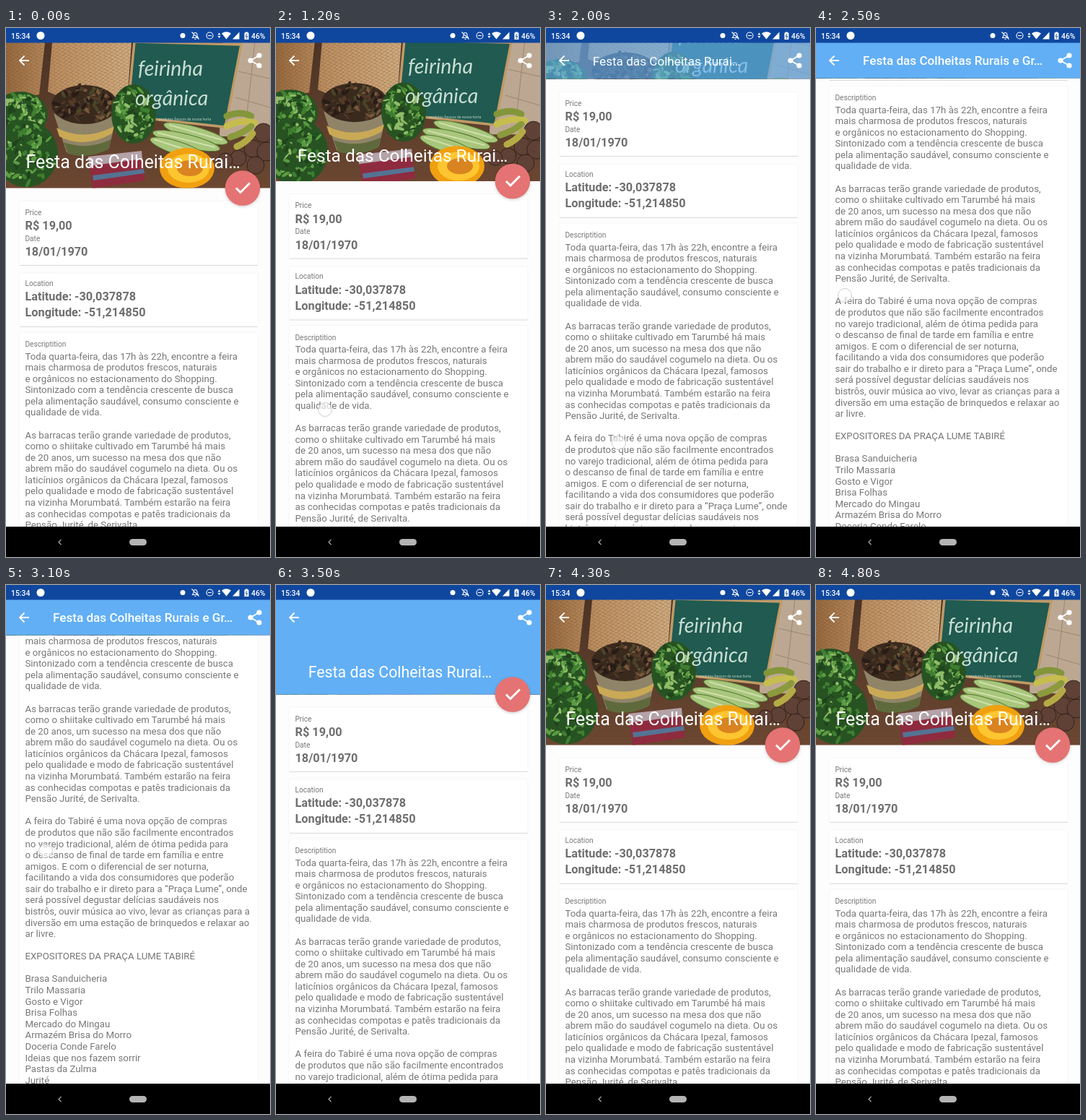
An HTML page that plays this animation: 366x732 px, repeating every 4.9 s.

```html
<!DOCTYPE html>
<html lang="pt">
<head>
<meta charset="utf-8">
<title>Event details</title>
<style>
html, body { margin: 0; width: 100%; height: 100%; overflow: hidden; background: #000 }
svg { display: block }
text { font-family: Roboto, sans-serif; white-space: pre }
.label { font-size: 10.1px; fill: #777 }
.value { font-size: 16.3px; font-weight: 700; fill: #6e6e6e }
.body { font-size: 13.25px; fill: #777 }
.card { fill: #fff; stroke: #f6f6f6 }
.bar { font-size: 10.4px; font-weight: 500; fill: #fff }
.chalk { font: italic 400 28.5px Lato, sans-serif; fill: #c9ded3 }
</style>
</head>
<body>
<svg width="366" height="732" viewBox="0 0 366 732">
  <defs>
    <pattern id="wicker" width="8" height="5" patternUnits="userSpaceOnUse" patternTransform="rotate(-6)">
      <path d="M0 1h5M4 3.5h4" stroke="#704726" stroke-opacity=".45"/>
    </pattern>
    <linearGradient id="straw">
      <stop stop-color="#96683e"/><stop offset=".4" stop-color="#bd9062"/><stop offset="1" stop-color="#cfab80"/>
    </linearGradient>
    <linearGradient id="shade" x2="0" y2="1">
      <stop stop-color="#4b3324"/><stop offset="1" stop-color="#6d4832"/>
    </linearGradient>
    <filter id="soft" x="-30%" y="-30%" width="160%" height="160%"><feGaussianBlur stdDeviation="2"/></filter>
  </defs>
  <rect width="366" height="732" fill="#fdfdfd"/>
  <g id="page"></g>

  <svg id="head" y="20" width="366" height="201">
    <g id="photo">
      <rect y="20" width="366" height="210" fill="url(#shade)"/>
      <path d="M300 20H366V150H296Z" fill="#bca892"/>
      <path d="M322 60L366 70M318 96L366 110M345 20L334 120" stroke="#9b8570"/>
      <path id="baskets" d="M0 20H54L46 92L0 100ZM64 20H174L168 100Q110 112 58 88Z" fill="url(#straw)"/>
      <path d="M0 20H54L46 92L0 100ZM64 20H174L168 100Q110 112 58 88Z" fill="url(#wicker)"/>
      <path d="M178 19L326 23L304 137L168 122Z" fill="#205a50" stroke="#c09a66" stroke-width="3.500"/>
      <path d="M66 118Q108 142 154 118L143 166Q112 182 84 172Z" fill="#8f8468"/>
      <path d="M70 138Q108 158 150 136L147 146Q108 168 74 150Z" fill="#c9a955"/>
      <path d="M80 158Q112 170 146 154L142 168Q112 182 86 174Z" fill="#5f6a3c"/>
      <g id="leaves"></g>
      <g class="words">
        <text class="chalk" x="183" y="66">feirinha</text>
        <text class="chalk" x="179" y="107">orgânica</text>
        <text x="212" y="128" font-size="5" fill="#bcd0c4">produtos frescos da nossa horta</text>
      </g>
      <g fill="#a8c67c" stroke="#52752f">
        <ellipse cx="263" cy="146" rx="46" ry="9" transform="rotate(16 263 146)"/>
        <ellipse cx="250" cy="156" rx="48" ry="9" transform="rotate(14 250 156)"/>
        <ellipse cx="238" cy="166" rx="40" ry="9" transform="rotate(18 238 166)"/>
      </g>
      <g fill="none" stroke="#dbe6b8" stroke-width="2" stroke-opacity=".8">
        <path d="M226 134L300 155M210 145L290 165M205 154L264 173"/>
      </g>
      <g fill="#5f4136" stroke="#32221d">
        <circle cx="357" cy="145" r="13"/><circle cx="342" cy="167" r="12"/>
        <circle cx="361" cy="171" r="13"/><circle cx="346" cy="190" r="12"/>
        <circle cx="322" cy="180" r="11"/><circle cx="304" cy="183" r="10"/>
      </g>
      <g fill="none" stroke-width="9" stroke-linecap="round">
        <path d="M306 122Q325 114 340 122" stroke="#83963a"/>
        <path d="M306 136Q326 126 345 131" stroke="#c6bd4f"/>
        <path d="M311 151Q328 146 340 136" stroke="#8a9a3c"/>
        <path d="M320 164Q334 158 342 146" stroke="#b5ab45"/>
      </g>
      <path d="M114 178L188 170L193 211L120 222Z" fill="#8f2b3e"/>
      <path d="M114 178L188 170L189 181L115 191Z" fill="#b3a3a8"/>
      <path d="M120 204L191 195L192 201L121 211Z" fill="#557394"/>
      <ellipse cx="251" cy="194" rx="38" ry="28" fill="#f0a010"/>
      <ellipse cx="253" cy="194" rx="29" ry="20" fill="#fdc52f"/>
      <ellipse cx="255" cy="194" rx="18" ry="11" fill="#d98420"/>
    </g>
    <rect id="scrim" width="366" height="210" fill="#62aff5"/>
  </svg>

  <g id="fab">
    <circle cy="1.500" r="24" fill="#000" opacity=".2" filter="url(#soft)"/>
    <circle r="24.3" fill="#e57373"/>
    <path d="M-9 0L-3 6L10 -7" fill="none" stroke="#fff" stroke-width="3"/>
  </g>
  <text id="title" fill="#fff"></text>
  <g fill="none" stroke="#fff" stroke-width="1.8">
    <path d="M32 45H19.5M25.500 38.500L19 45L25.500 51.500"/>
    <path d="M351 38L339 45L351 52"/>
  </g>
  <g fill="#fff"><circle cx="351" cy="38" r="3.6"/><circle cx="339" cy="45" r="3.6"/><circle cx="351" cy="52" r="3.6"/></g>

  <rect width="366" height="20.500" fill="#0f479f"/>
  <text class="bar" x="7" y="14.500">15:34</text>
  <circle cx="48" cy="10.500" r="5.500" fill="#fff"/>
  <circle cx="245" cy="10.500" r="3.500" fill="#fff"/>
  <g fill="none" stroke="#fff" stroke-width="1.1">
    <path d="M258.500 13.500H266.500L265 11V9Q264.500 6.500 262.500 6.500T260 9V11ZM257.500 5.500L267.500 15.500M261.500 15.500H263.500"/>
    <circle cx="282.500" cy="10.500" r="4.500"/><path d="M280 10.500H285"/>
  </g>
  <path d="M293.500 9.500L295.500 6.500L297.500 9.500ZM293.500 11L295.500 14L297.500 11ZM299 7.500Q305.500 3 312 7.500L305.500 15.500ZM314 15.500H323.500V5.500ZM330.500 6.500H332V5.500H335V6.500H336.500V16H330.500Z" fill="#fff"/>
  <path d="M334 8L332.300 11.500H334.700L333 15" fill="none" stroke="#0f479f" stroke-width=".9"/>
  <text class="bar" x="340" y="14.500">46%</text>

  <rect y="690" width="366" height="42"/>
  <path d="M76.500 708L73 711.500L76.500 715" fill="none" stroke="#aaa" stroke-width="1.2"/>
  <rect x="171" y="707" width="24" height="9" rx="4.500" fill="#b4b4b4"/>
  <circle id="touch" r="9.500" fill="#fff" fill-opacity=".65" stroke="#bbb" stroke-opacity=".75"/>
</svg>
<script>
const $ = id => document.getElementById(id);
const LOOP = 4900, STEP = 100, RANGE = 152;
const clamp = v => Math.max(0, Math.min(1, v));
const mix = (a, b, k) => a + (b - a) * k;

// Piecewise linear value through [time, ...values] points
function along(points, t) {
  const i = points.findIndex(p => p[0] > t);
  if (i < 0) return points.at(-1).slice(1);
  if (!i) return points[0].slice(1);
  const [a, b] = [points[i - 1], points[i]];
  const k = (t - a[0]) / (b[0] - a[0]);
  return a.slice(1).map((v, n) => mix(v, b[n + 1], k));
}

const about = `Toda quarta-feira, das 17h às 22h, encontre a feira
mais charmosa de produtos frescos, naturais
e orgânicos no estacionamento do Shopping.
Sintonizado com a tendência crescente de busca
pela alimentação saudável, consumo consciente e
qualidade de vida.

As barracas terão grande variedade de produtos,
como o shiitake cultivado em Tarumbé há mais
de 20 anos, um sucesso na mesa dos que não
abrem mão do saudável cogumelo na dieta. Ou os
laticínios orgânicos da Chácara Ipezal, famosos
pelo qualidade e modo de fabricação sustentável
na vizinha Morumbatá. Também estarão na feira
as conhecidas compotas e patês tradicionais da
Pensão Jurité, de Serivalta.

A feira do Tabiré é uma nova opção de compras
de produtos que não são facilmente encontrados
no varejo tradicional, além de ótima pedida para
o descanso de final de tarde em família e entre
amigos. E com o diferencial de ser noturna,
facilitando a vida dos consumidores que poderão
sair do trabalho e ir direto para a “Praça Lume”, onde
será possível degustar delícias saudáveis nos
bistrôs, ouvir música ao vivo, levar as crianças para a
diversão em uma estação de brinquedos e relaxar ao
ar livre.

EXPOSITORES DA PRAÇA LUME TABIRÉ

Brasa Sanduicheria
Trilo Massaria
Gosto e Vigor
Brisa Folhas
Mercado do Mingau
Armazém Brisa do Morro
Doceria Conde Farelo
Ideias que nos fazem sorrir
Pastas da Zulma
Jurité`;

const card = (y, h) => `<rect class="card" x="18" y="${y}" width="331" height="${h}" rx="2"/>
  <path d="M19 ${y + h + .5}H349" stroke="#dcdcdc"/>`;
const line = (type, y, s) => `<text class="${type}" x="26.500" y="${y}">${s}</text>`;

$('page').innerHTML = card(239, 89) + card(339, 74) + card(421, 760) +
  line('label', 258.5, 'Price') + line('value', 279, 'R$ 19,00') +
  line('label', 294.5, 'Date') + line('value', 315, '18/01/1970') +
  line('label', 356.7, 'Location') + line('value', 377.3, 'Latitude: -30,037878') +
  line('value', 399.3, 'Longitude: -51,214850') + line('label', 441, 'Descriptition') +
  about.split('\n').map((s, i) => line('body', 458.5 + i * 15.58, s)).join('');

let seed = 7;
const random = () => (seed = seed * 16807 % 2147483647) / 2147483647;

// A dark clump covered with small leaves; the first colour is its shadow
function lettuce(cx, cy, rx, ry, colors) {
  const leaves = Array.from({ length: 110 }, () => {
    const a = random() * 6.28, d = Math.sqrt(random()) * .9;
    const x = cx + Math.cos(a) * d * rx, y = cy + Math.sin(a) * d * ry;
    return `<ellipse cx="${x}" cy="${y}" rx="${2 + random() * 5}" ry="${1 + random() * 2}"
      fill="${colors[Math.floor(random() * colors.length)]}" transform="rotate(${random() * 180} ${x} ${y})"/>`;
  });
  return `<ellipse cx="${cx}" cy="${cy}" rx="${rx}" ry="${ry}" fill="${colors[0]}"/>` + leaves.join('');
}
const greens = ['#275322', '#1f431c', '#3f7f30', '#5b9c42', '#8fbc68'];
$('leaves').innerHTML = lettuce(20, 120, 38, 32, greens) + lettuce(28, 174, 44, 46, greens) +
  lettuce(109, 106, 46, 27, ['#3a2a1e', '#281c17', '#553a28', '#4b4529', '#78583c']) +
  lettuce(177, 119, 31, 41, greens);

const scrollPath = [[1100, 0], [1200, 9.5], [1400, 72], [1600, 138], [1700, 151], [2000, 151],
  [2100, 178], [2300, 272], [2500, 341], [2700, 380], [2900, 392], [3100, 392],
  [3200, 335], [3500, 70], [3700, 0]];
const drags = [
  [[1100, 68, 537], [1200, 68, 528], [1600, 82, 400]],
  [[2000, 101, 574], [2100, 88, 547], [2300, 58, 440], [2500, 40, 370]],
  [[3100, 55, 368], [3200, 65, 425], [3400, 100, 600]],
  [[3700, 92, 350], [3900, 97, 430]]
];
const scrimPath = [[1600, 0], [2200, 1], [3600, 1], [4200, 0]];

function draw(t) {
  const [scroll] = along(scrollPath, t);
  const k = clamp(scroll / RANGE), bottom = 221.5 - k * RANGE;
  $('page').setAttribute('transform', `translate(0 ${-scroll})`);
  $('head').setAttribute('height', bottom - 20);
  $('photo').setAttribute('transform', `translate(0 ${-20 - .3 * k * RANGE})`);
  $('scrim').setAttribute('opacity', along(scrimPath, t)[0]);
  $('fab').setAttribute('transform', `translate(328 ${bottom}) scale(${clamp((110 - scroll) / 30)})`);

  const title = $('title');
  title.textContent = 'Festa das Colheitas Rurai' + (k < 1 ? '…' : 's e Gr…');
  title.setAttribute('x', mix(27.5, 65, k));
  title.setAttribute('y', mix(193.5, 51, k));
  title.style.fontSize = mix(24.9, 17.1, k) + 'px';
  title.style.fontWeight = k < 1 ? 400 : 500;

  const drag = drags.find(d => t >= d[0][0] && t <= d.at(-1)[0]);
  $('touch').setAttribute('visibility', drag ? 'visible' : 'hidden');
  if (drag) $('touch').setAttribute('transform', `translate(${along(drag, t)})`);
}

function tick() {
  draw(Math.floor(performance.now() % LOOP / STEP) * STEP);
  requestAnimationFrame(tick);
}
tick();
</script>
</body>
</html>
```
